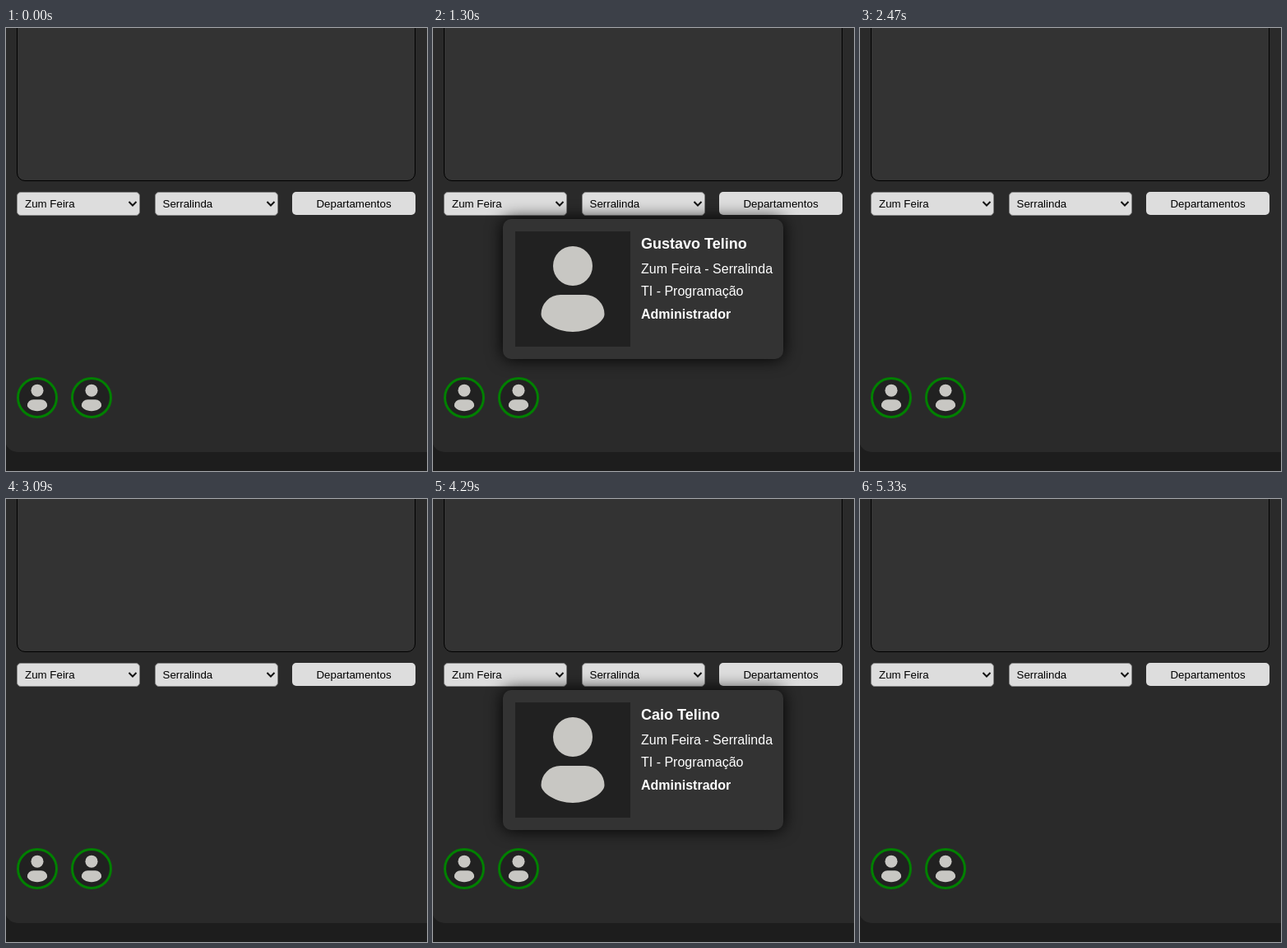
An HTML page that plays this animation: 512 by 538 pixels, repeating every 6.24 s.

```html
<!DOCTYPE html>
<html lang="pt">
<head>
<meta charset="utf-8">
<style>
  html, body { margin: 0; height: 100%; overflow: hidden; background: #1d1d1d; }
  svg { display: block; font: 13.333px "Liberation Sans", Arial, sans-serif; }
  .field { fill: #ddd; }
  .select { stroke: #858585; }
  .chevron { fill: none; stroke: #111; stroke-width: 2; }
  .ring { fill: #212121; stroke: #008000; stroke-width: 3; }
  #card text { fill: #fff; font-size: 16px; }
  #card .bold { font-weight: bold; }
  #card #name { font-size: 18px; }
  .shadow { filter: drop-shadow(0 0 10px #000); }
</style>
</head>
<body>
<svg width="512" height="538" viewBox="0 0 512 538">
  <defs>
    <symbol id="person" viewBox="0 0 140 140">
      <g fill="#c8c7c3">
        <circle cx="70" cy="42" r="24"/>
        <path d="M55 77H85A23.5 23.5 0 0 1 108.5 100.5C108.5 110 90 122 70 122S31.5 110 31.5 100.5A23.5 23.5 0 0 1 55 77Z"/>
      </g>
    </symbol>
    <g id="select">
      <rect class="field select" x=".5" y=".5" width="149" height="28" rx="4.5"/>
      <path class="chevron" d="M136.5 12l4.5 4.5 4.5-4.5"/>
    </g>
    <g id="avatar">
      <circle class="ring" cx="25" cy="25" r="23.5"/>
      <use href="#person" x="3" y="3" width="44" height="44"/>
    </g>
  </defs>

  <rect x="-1" y="-20" width="540" height="535" rx="15" fill="#2a2a2a"/>
  <rect x="13.5" y="-20" width="484" height="205.5" rx="9.5" fill="#333" stroke="#000"/>

  <use href="#select" x="13" y="199"/>
  <text x="23" y="218">Zum Feira</text>
  <use href="#select" x="181" y="199"/>
  <text x="190.500" y="218">Serralinda</text>
  <rect class="field" x="348" y="199" width="150" height="28" rx="5"/>
  <text x="423" y="218" text-anchor="middle">Departamentos</text>

  <use href="#avatar" x="13" y="424"/>
  <use href="#avatar" x="79" y="424"/>

  <g id="card" visibility="hidden">
    <rect class="shadow" x="85" y="232" width="341" height="170" rx="10" fill="#333"/>
    <rect x="100" y="247" width="140" height="140" fill="#212121"/>
    <use href="#person" x="100" y="247" width="140" height="140"/>
    <text id="name" class="bold" x="253" y="268"></text>
    <text x="253" y="298">Zum Feira - Serralinda</text>
    <text x="253" y="325">TI - Programação</text>
    <text class="bold" x="253" y="353">Administrador</text>
  </g>
</svg>
<script>
  const LOOP = 6240;
  const hovers = [
    { from: 1300, to: 2470, name: "Gustavo Telino" },
    { from: 3510, to: 5330, name: "Caio Telino" },
  ];
  const card = document.getElementById("card");
  const label = document.getElementById("name");

  function draw() {
    const t = performance.now() % LOOP;
    const hover = hovers.find(h => t >= h.from && t < h.to);
    card.setAttribute("visibility", hover ? "visible" : "hidden");
    label.textContent = hover ? hover.name : "";
    requestAnimationFrame(draw);
  }
  draw();
</script>
</body>
</html>
```
